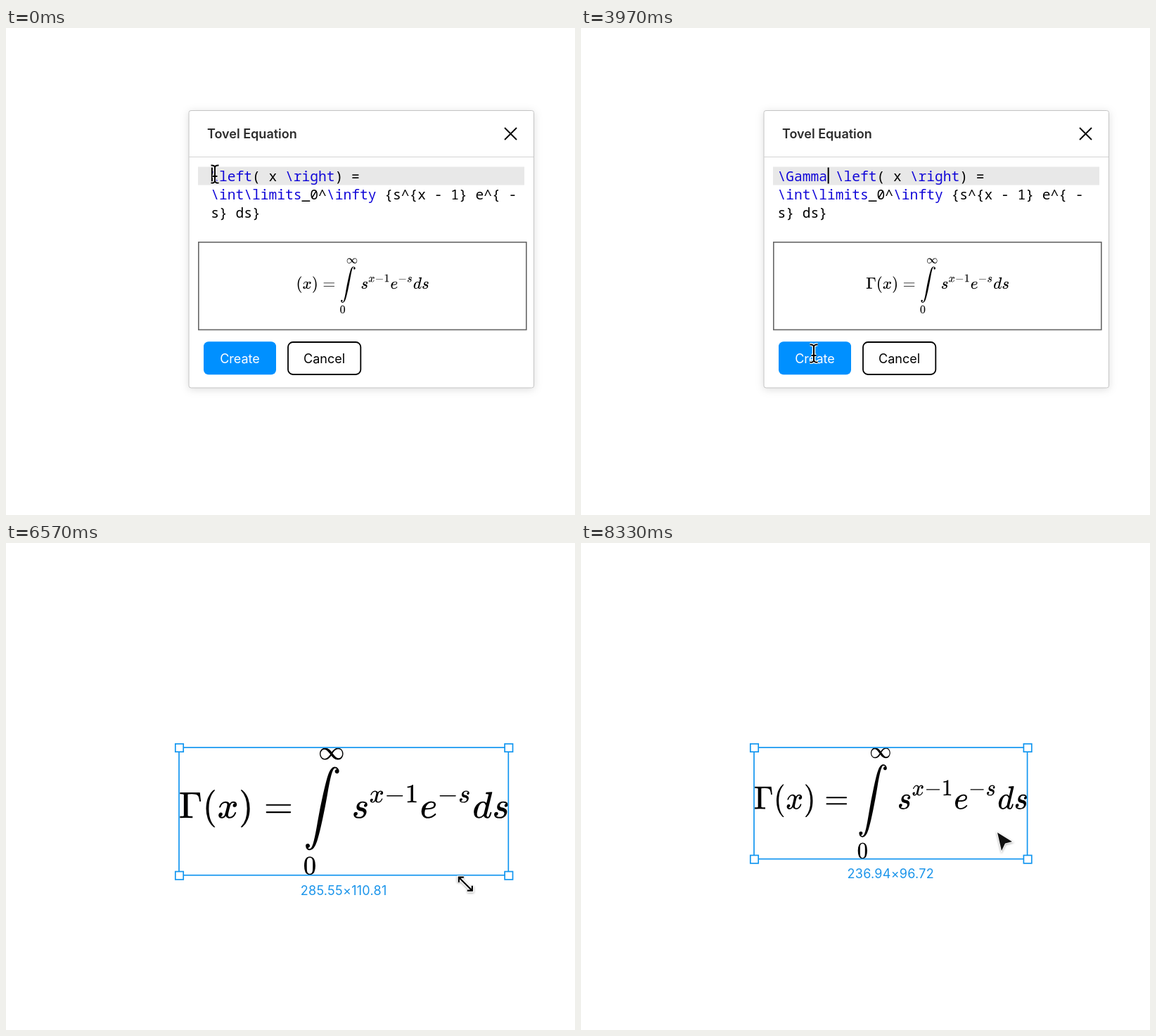
Write an HTML page that moves like this. It is 809x693 px and loops after 8.36 s.

```html
<!DOCTYPE html>
<html lang="en">
<head>
<meta charset="utf-8">
<title>Equation editor</title>
<style>
  html, body { margin: 0; width: 100%; height: 100%; overflow: hidden; background: #fff; }
  svg { display: block; }
  text { font: 18px Inter, sans-serif; }
  .code text { font: 19.6px "Noto Sans Mono", "DejaVu Sans Mono", monospace; white-space: pre; }
  .cmd { fill: #1208d8; }
  .bad { fill: #c40000; }
  .panel { filter: drop-shadow(0 2px 6px rgba(0, 0, 0, .13)); }
  .halo { stroke: #fff; stroke-width: 4.5; }
  #size { letter-spacing: .27px; fill: #1a94ea; }
  #arrow, #resize { filter: drop-shadow(0 1.5px 1.5px rgba(0, 0, 0, .35)); }
</style>
</head>
<body>
<svg width="809" height="693" viewBox="0 0 809 693">
  <defs>
    <path id="Gamma" d="M128 619Q121 626 117 628T101 631T58 634H25V680H554V676Q556 670 568 560T582 444V440H542V444Q542 478 523 545T492 598Q454 634 349 634H334Q264 634 249 633T233 621Q233 618 233 339L234 61Q240 54 245 52T270 48T333 46H360V0H348Q324 3 182 3Q51 3 36 0H25V46H58Q100 47 109 49T128 61V619Z"/>
    <path id="open" d="M94 250Q94 319 104 381T127 488T164 576T202 643T244 695T277 729T302 750H319Q333 750 333 741Q333 738 316 720T275 667T226 581T184 443T167 250T184 58T225 -81T274 -167T316 -220T333 -241Q333 -250 318 -250H302L274 -226Q180 -141 137 -14T94 250Z"/>
    <path id="close" d="M60 749L64 750H86L114 726Q208 641 251 514T294 250Q294 182 284 119T261 12T224 -76T186 -143T145 -194T113 -227T86 -250H74Q55 -250 55 -238Q56 -237 66 -225Q221 -64 221 250T66 725Q56 737 55 738Q55 746 60 749Z"/>
    <path id="x" d="M52 289Q59 331 106 386T222 442Q257 442 286 424T329 379Q371 442 430 442Q467 442 494 420T522 361Q522 332 508 314T481 292T458 288Q439 288 427 299T415 328Q415 374 465 391Q454 404 425 404Q412 404 406 402Q368 386 350 336Q290 115 290 78Q290 50 306 38T341 26Q378 26 414 59T463 140Q466 153 485 153Q504 153 504 145Q504 144 502 134Q486 77 440 33T333 -11Q263 -11 227 52Q186 -10 133 -10H127Q78 -10 57 16T35 71Q35 103 54 123T99 143Q142 143 142 101Q142 81 130 66T107 46T91 40Q105 26 132 26Q168 26 194 71Q203 87 217 139T245 247T261 313Q266 340 266 352Q266 380 251 392T217 404Q177 404 142 372T93 290Q91 278 72 278H58Q52 284 52 289Z"/>
    <path id="equals" d="M56 347Q56 360 70 367H707Q722 359 722 347Q722 336 708 327H72Q56 332 56 347ZM56 153Q56 168 72 173H708Q722 163 722 153Q722 140 707 133H70Q56 140 56 153Z"/>
    <path id="int" d="M114 -798Q132 -824 165 -824H167Q195 -824 223 -764T275 -600T320 -391T362 -164L367 -133Q439 292 523 655T645 1127Q651 1145 655 1157T672 1201T699 1257T733 1306T777 1346T828 1360Q884 1360 912 1325T944 1245Q944 1220 932 1205T909 1186T888 1183Q866 1183 849 1198T832 1239Q832 1287 885 1296Q866 1323 833 1323Q819 1323 807 1311T775 1255T736 1139T689 936T633 628Q574 293 510 -5T410 -437T355 -629Q278 -862 165 -862Q125 -862 92 -831T55 -746Q55 -711 74 -698T112 -685Q133 -685 150 -700T167 -741Q167 -789 114 -798Z"/>
    <path id="infty" d="M55 217Q55 305 111 373T254 442Q342 442 419 381Q457 350 493 303L507 284L514 294Q618 442 747 442Q833 442 888 374T944 214Q944 128 889 59T743 -11Q657 -11 580 50Q542 81 506 128L492 147L485 137Q381 -11 252 -11Q166 -11 111 57T55 217ZM907 217Q907 285 869 341T761 397Q650 397 559 263L543 238L574 198Q605 158 622 138T664 94T714 61T765 51Q827 51 867 100T907 217ZM92 214Q92 145 131 89T239 33Q357 33 456 193L425 233Q364 312 334 337Q285 380 233 380Q171 380 132 331T92 214Z"/>
    <path id="zero" d="M96 585Q152 666 249 666Q297 666 345 640T423 548Q460 465 460 320Q460 165 417 83Q397 41 362 16T301 -15T250 -22Q224 -22 198 -16T137 16T82 83Q39 165 39 320Q39 494 96 585ZM321 597Q291 629 250 629Q208 629 178 597Q153 571 145 525T137 333Q137 175 145 125T181 46Q209 16 250 16Q290 16 318 46Q347 76 354 130T362 333Q362 478 354 524T321 597Z"/>
    <path id="s" d="M131 289Q131 321 147 354T203 415T300 442Q362 442 390 415T419 355Q419 323 402 308T364 292Q351 292 340 300T328 326Q328 342 337 354T354 372T368 379Q368 382 361 388T336 399T297 405Q249 405 227 379T204 326Q204 301 223 291T278 274T330 259Q396 230 396 163Q396 135 385 107T352 51T289 7T195 -10Q118 -10 86 19T53 87Q53 126 74 143T118 160Q133 160 146 151T160 120Q160 94 142 76T107 55Q108 52 115 47T146 34T201 27Q237 27 263 38T301 66T318 97T323 122Q323 150 302 164T254 181T195 196T148 231Q131 256 131 289Z"/>
    <path id="minus" d="M84 250Q84 263 98 270H679Q694 262 694 250T679 230H98Q84 237 84 250Z"/>
    <path id="one" d="M213 578L200 573Q186 568 160 563T102 556H83V602H102Q149 604 189 617T245 641T273 663Q275 666 285 666Q294 666 302 660V361L303 61Q310 54 315 52T339 48T401 46H427V0H416Q395 3 257 3Q121 3 100 0H88V46H136Q213 46 213 61V578Z"/>
    <path id="e" d="M39 168Q39 225 58 272T107 350T174 402T244 433T307 442H310Q355 442 388 420T421 355Q421 265 310 237Q261 224 176 223Q139 223 138 221Q138 219 132 186T125 128Q125 81 146 54T209 26T302 45T394 111Q403 121 406 121Q410 121 419 112T429 98T420 82T391 55T344 24T281 -1T205 -11Q126 -11 83 42T39 168ZM373 353Q367 405 305 405Q272 405 244 391T199 357T170 316T154 280T149 261Q149 260 169 260Q282 260 327 284T373 353Z"/>
    <path id="d" d="M366 683L511 694Q523 694 523 686Q523 679 450 384T375 83T374 68Q374 26 402 26Q411 27 422 35Q443 55 463 131Q469 153 483 153H491Q506 153 506 145Q506 140 503 129Q490 79 473 48T445 8T417 -8Q409 -10 393 -10Q359 -10 336 5T306 36L300 51L292 46Q233 -10 172 -10Q117 -10 75 30T33 157Q33 205 53 255T101 341Q148 398 195 420T280 442Q336 442 364 400L369 396Q370 400 396 505T424 616Q424 629 417 632T378 637H357Q351 643 351 645T353 664Q358 683 366 683ZM352 326Q329 405 277 405Q242 405 210 374T160 293Q131 214 119 129L118 106Q118 61 136 44T179 26Q233 26 290 98L298 109L352 326Z"/>
    <!-- formula body, 8750 by 3400 units, y up from the baseline -->
    <g id="body">
      <use href="#open" x="625"/><use href="#x" x="1014"/><use href="#close" x="1586"/>
      <use href="#equals" x="2253"/><use href="#int" x="3309"/>
      <g transform="translate(3697 1555) scale(.707)"><use href="#infty"/></g>
      <g transform="translate(3298 -1500) scale(.707)"><use href="#zero"/></g>
      <use href="#s" x="4585"/>
      <g transform="translate(5052 413) scale(.707)"><use href="#x"/><use href="#minus" x="572"/><use href="#one" x="1350"/></g>
      <use href="#e" x="6400"/>
      <g transform="translate(6866 413) scale(.707)"><use href="#minus"/><use href="#s" x="778"/></g>
      <use href="#d" x="7798"/><use href="#s" x="8318"/>
    </g>
    <path id="beamShape" d="M-5.5-12.5Q0-13 0-9Q0-13 5.5-12.5M0-9V9M-5.5 12.5Q0 13 0 9Q0 13 5.5 12.5M-3.5 3H3.5"/>
    <path id="resizeShape" d="M-8.5-8.5L8.5 8.5M-9.5-2.5V-9.5H-2.5M9.5 2.5V9.5H2.5"/>
  </defs>

  <g id="dialog">
    <rect class="panel" x="260" y="117.5" width="490.5" height="394.5" rx="3" fill="#fff" stroke="#c4c4c4"/>
    <path d="M260 183.5H750" stroke="#d4d4d4"/>
    <text x="286" y="157" font-weight="600" style="font-weight:600" fill="#2c2c2c">Tovel Equation</text>
    <path d="M709 142L726 159M726 142L709 159" stroke="#000" stroke-width="1.8"/>
    <rect x="273" y="197.5" width="464" height="26" fill="#e8e8e8"/>
    <g class="code">
      <text id="typed" x="279.5" y="217.5"></text>
      <text id="line1" y="217.5"><tspan class="cmd">\left</tspan>( x <tspan class="cmd">\right</tspan>) =</text>
      <g id="wrapped">
        <text x="279.5" y="243.8"><tspan class="cmd">\int\limits</tspan>_0^<tspan class="cmd">\infty</tspan> {s^{x - 1} e^{ -</text>
        <text x="279.5" y="269.8">s} ds}</text>
      </g>
      <rect id="caret" y="198.5" width="2" height="23"/>
    </g>
    <rect x="273.8" y="304.8" width="466" height="124.6" fill="#fff" stroke="#666" stroke-width="1.6"/>
    <g id="preview"><use id="previewGamma" href="#Gamma"/><use href="#body"/></g>
    <rect x="281" y="446.3" width="103" height="47" rx="7" fill="#0090ff"/>
    <text x="332.5" y="477" text-anchor="middle" fill="#fff">Create</text>
    <rect x="401" y="447" width="103.3" height="46" rx="7" fill="#fff" stroke="#000" stroke-width="1.8"/>
    <text x="452.5" y="477" text-anchor="middle">Cancel</text>
  </g>

  <g id="formula"><use href="#Gamma"/><use href="#body"/></g>
  <g id="selection" fill="#fff" stroke="#1296f0" stroke-width="1.7">
    <rect id="frame" x="246" y="291" fill="none"/>
    <rect class="knob" width="11.4" height="11.4"/>
    <rect class="knob" width="11.4" height="11.4"/>
    <rect class="knob" width="11.4" height="11.4"/>
    <rect class="knob" width="11.4" height="11.4"/>
    <text id="size" text-anchor="middle" stroke="none"></text>
  </g>

  <g id="beam" fill="none" stroke="#000" stroke-width="2">
    <use href="#beamShape" class="halo"/><use href="#beamShape"/>
  </g>
  <path id="arrow" d="M0 0L21 13L11 15.5L6 26Z" fill="#111" stroke="#fff" stroke-width="2" paint-order="stroke"/>
  <g id="resize" fill="none" stroke="#000" stroke-width="2.2">
    <use href="#resizeShape" class="halo" style="stroke-width:5"/><use href="#resizeShape"/>
  </g>
</svg>
<script>
const LOOP = 8360, COL = 11.76, LEFT = 279.5;
const CLOSE = 4000, SELECT = 4700;
const BOX = { x: 246, y: 291, zoom: 1.64 };
const WORD = "\\Gamma";
const KEYS = [400, 1620, 1850, 2080, 2310, 2540];

// [time, x, y]
const MOUSE = [
  [2960, 297, 208], [3130, 302, 225], [3350, 320, 380], [3550, 331, 462],
  [4690, 331, 465], [4770, 331, 399], [5000, 345, 390], [5570, 371, 390],
  [5900, 480, 402], [6200, 574, 419], [6430, 584, 432], [6570, 653, 485],
  [6800, 730, 524], [7000, 705, 506], [7230, 664, 481], [7600, 622, 462],
  [7900, 628, 452], [8160, 626, 446], [8330, 592, 412]
];
// [time, width, height]
const SIZE = [
  [6430, 200, 77.61], [6570, 285.32, 110.72], [6800, 338, 131.16],
  [7000, 324, 125.73], [7230, 298.21, 115.72], [7600, 252, 101.5], [7950, 236.94, 96.72]
];

const $ = id => document.getElementById(id);
const set = (el, attrs) => { for (const k in attrs) el.setAttribute(k, attrs[k]); };
const show = (id, on) => { $(id).style.display = on ? "" : "none"; };
const move = (id, x, y) => set($(id), { transform: `translate(${x} ${y})` });
const knobs = document.querySelectorAll(".knob");

function track(keys, t) {
  const i = keys.findIndex(k => k[0] > t);
  if (i === 0) return keys[0].slice(1);
  if (i < 0) return keys[keys.length - 1].slice(1);
  const a = keys[i - 1], b = keys[i], p = (t - a[0]) / (b[0] - a[0]);
  return [1, 2].map(n => a[n] + (b[n] - a[n]) * p);
}

function placeFormula(id, x, y, sx, sy) {
  set($(id), { transform: `translate(${x} ${y + 1885 * sy}) scale(${sx} ${-sy})` });
}

function drawDialog(t) {
  const count = KEYS.filter(k => k <= t).length;
  const done = count === WORD.length;
  const lastKey = count ? KEYS[count - 1] : 0;
  $("typed").textContent = WORD.slice(0, count);
  $("typed").setAttribute("class", count === 1 ? "bad" : "cmd");
  set($("line1"), { x: LEFT + (count + 1) * COL });
  move("wrapped", count ? 0 : COL, 0);
  set($("caret"), { x: LEFT + Math.max(count, 1) * COL + .6 });
  show("caret", Math.floor((t - lastKey) / 530) % 2 === 0);
  show("previewGamma", done);
  placeFormula("preview", done ? 405.3 : count ? 401.5 : 398, 327.2, .0232, .0232);
}

function drawSelection(t) {
  const [w, h] = track(SIZE, t);
  const pw = w * BOX.zoom, ph = h * BOX.zoom;
  placeFormula("formula", BOX.x, BOX.y - .5, pw / 8750, ph / 3400);
  set($("frame"), { width: pw, height: ph });
  knobs.forEach((k, i) => set(k, {
    x: BOX.x + (i % 2) * pw - 5.2,
    y: BOX.y + (i >> 1) * ph - 5.2
  }));
  set($("size"), { x: BOX.x + pw / 2, y: BOX.y + ph + 27.8 });
  $("size").textContent = `${+w.toFixed(2)}×${+h.toFixed(2)}`;
}

function drawMouse(t) {
  const kind = t < 4900 ? "beam" : t >= 6180 && t < 8160 ? "resize" : "arrow";
  for (const id of ["beam", "arrow", "resize"]) show(id, id === kind);
  move(kind, ...track(MOUSE, t));
}

const start = performance.now();
function draw(now) {
  const t = Math.max(0, now - start) % LOOP;
  show("dialog", t < CLOSE);
  show("formula", t >= CLOSE);
  show("selection", t >= SELECT);
  drawDialog(t);
  drawSelection(t);
  drawMouse(t);
  requestAnimationFrame(draw);
}
draw(start);
</script>
</body>
</html>
```
